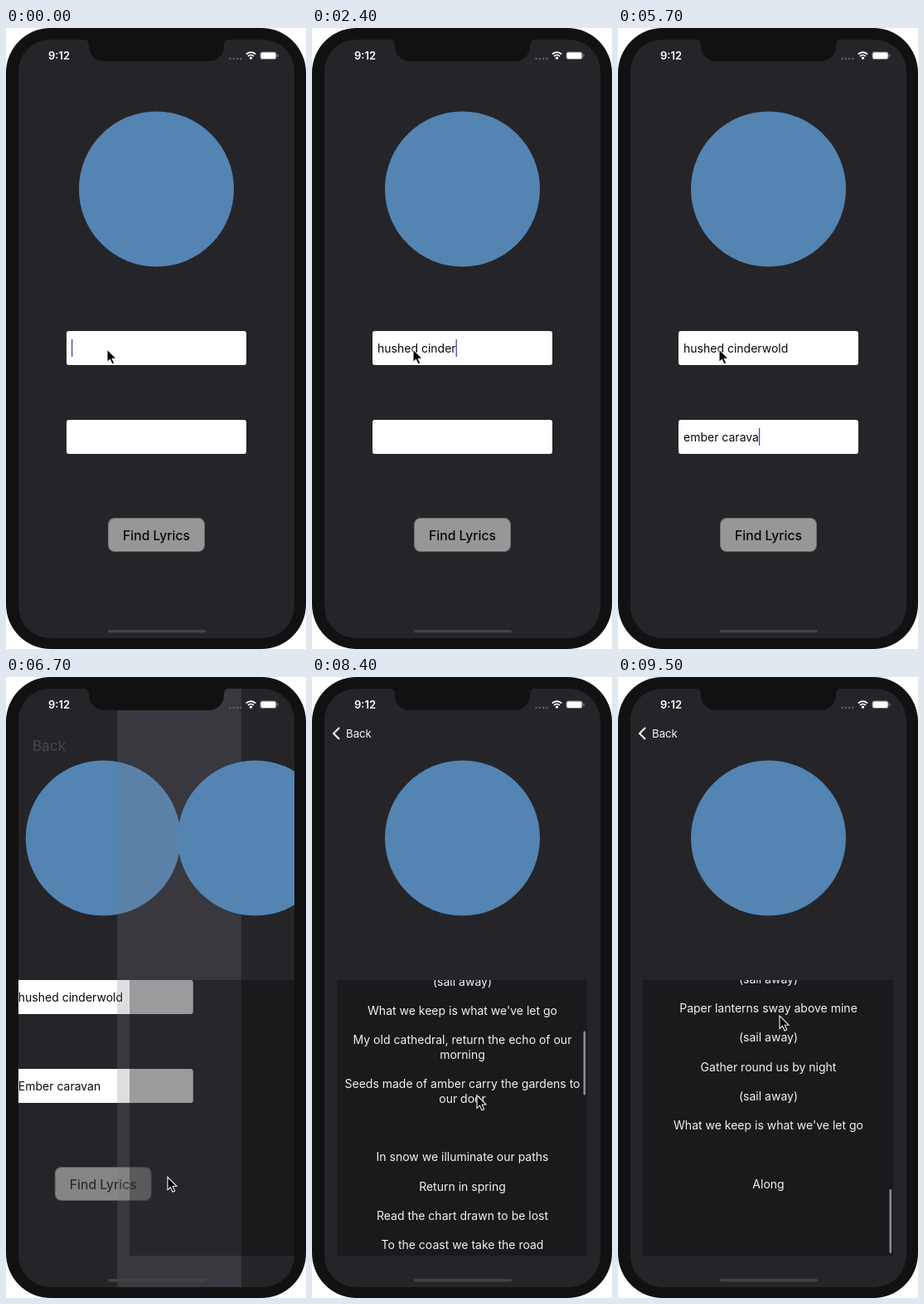
These frames come from a looping animation (362 by 748 pixels, 9600 ms). An HTML page with a canvas:

```html
<!DOCTYPE html>
<html lang="en">
<head>
<meta charset="utf-8">
<title>Lyrics finder</title>
<style>
html, body { margin: 0; width: 100%; height: 100%; overflow: hidden; background: #fff; }
canvas { display: block; width: 362px; height: 748px; }
</style>
</head>
<body>
<canvas id="stage" width="362" height="748"></canvas>
<script>
const ctx = document.getElementById('stage').getContext('2d');
const LOOP = 9600;
const ARTIST = 'hushed cinderwold', SONG = 'ember caravan';
const SCREEN = { x: 15, y: 14, w: 333, h: 721 };
const PANEL = { x: 30, y: 365, w: 302, h: 332 };
const LINE = 17.65, MAX_SCROLL = 1111;
const PAGE_FILL = 'rgba(118,118,128,.24)';

const VERSE = "Rain marks the shutters of the mill|The road is worn|In the valley, lamps relit|" +
  "Yet by dusk there's no one near|Rivers wander past the stones";
const REFRAIN = "||(sail away)||Paper lanterns sway above mine||(sail away)||" +
  "Gather round us by night||(sail away)||What we keep is what we've let go";
const CHORUS = "||My old cathedral, return the echo of our|morning||" +
  "Seeds made of amber carry the gardens to|our door";
const BRIDGE = "||||In snow we illuminate our paths||Return in spring||" +
  "Read the chart drawn to be lost||To the coast we take the road";
const LYRICS = (VERSE + REFRAIN + CHORUS + BRIDGE +
  '||(sail away)||Open windows call the evening in||(sail away)||Quiet boats are turning home' +
  CHORUS + '||||In the end we learn the way||' +
  '||(sail away)||' + VERSE + REFRAIN + '||||Along').split('|');

const clamp = v => Math.min(1, Math.max(0, v));
const mix = (a, b, u) => a + (b - a) * u;

// Linear interpolation through [time, value] points
function track(t, points) {
  let [t0, v0] = points[0];
  for (const [t1, v1] of points) {
    if (t < t1) return mix(v0, v1, clamp((t - t0) / (t1 - t0)));
    [t0, v0] = [t1, v1];
  }
  return v0;
}

function box(x, y, w, h, r, fill) {
  ctx.beginPath();
  ctx.roundRect(x, y, w, h, r);
  ctx.fillStyle = fill;
  ctx.fill();
}

function disc(x, y, r, fill) {
  ctx.beginPath();
  ctx.arc(x, y, r, 0, 7);
  ctx.fillStyle = fill;
  ctx.fill();
}

function label(text, x, y, size, fill, align = 'left', weight = 400) {
  ctx.font = `${weight} ${size}px Inter, sans-serif`;
  ctx.textAlign = align;
  ctx.textBaseline = 'alphabetic';
  ctx.fillStyle = fill;
  ctx.fillText(text, x, y + size * .36);
}

const logo = () => disc(181.5, 194, 93.5, '#5484b2');

function field(y, text, caret) {
  box(73, y, 217, 41, 3, '#fff');
  label(text, 79, y + 20.5, 14, '#0a0a0a');
  if (caret) box(79 + ctx.measureText(text).width, y + 10, 1.3, 21, 0, '#3d48a0');
}

function typed(word, t, start, step) {
  return word.slice(0, Math.floor(clamp((t - start) / (step * word.length)) * word.length + 1e-6));
}

function searchPage(t) {
  box(SCREEN.x, SCREEN.y, SCREEN.w, SCREEN.h, 0, PAGE_FILL);
  logo();
  const first = t < 3250;
  const artist = typed(ARTIST, t, 400, 150);
  let song = typed(SONG, t, 3500, 175);
  if (t >= 6000) song = song[0].toUpperCase() + song.slice(1);
  field(365, artist, first);
  field(472, song, !first && t < 6000);
  ctx.globalAlpha = t > 6400 ? .7 : 1;
  box(123, 590, 117, 41, 8, '#717173');
  box(124, 591, 115, 39, 7, '#979798');
  label('Find Lyrics', 181.5, 611, 15.7, '#080808', 'center', 500);
  ctx.globalAlpha = 1;
}

function lyricsPage(t, scroll) {
  box(SCREEN.x, SCREEN.y, SCREEN.w, SCREEN.h, 0, PAGE_FILL);
  logo();
  box(PANEL.x, PANEL.y, PANEL.w, PANEL.h, 0, 'rgba(0,0,0,.3)');
  if (t < 7200) return;
  ctx.save();
  ctx.beginPath();
  ctx.rect(PANEL.x, PANEL.y, PANEL.w, PANEL.h);
  ctx.clip();
  LYRICS.forEach((line, i) => {
    const y = 380.5 + i * LINE - scroll;
    if (line && y > 350 && y < 712) label(line, 181.5, y, 14, '#f2f2f2', 'center');
  });
  if (scroll > 0) box(327.5, mix(368, 617, scroll / MAX_SCROLL), 2.6, 77, 1.3, '#8b8b8e');
  ctx.restore();
}

function backButton(p) {
  ctx.globalAlpha = p ** 4;
  label('Back', mix(15, 41, p), mix(110, 68, p), mix(25, 13.2, p), '#f4f4f4');
  ctx.globalAlpha = clamp(p * 4 - 3);
  ctx.beginPath();
  ctx.moveTo(33, 61);
  ctx.lineTo(26, 68);
  ctx.lineTo(33, 75);
  ctx.strokeStyle = '#fff';
  ctx.lineWidth = 2;
  ctx.stroke();
  ctx.globalAlpha = 1;
}

function statusBar() {
  ctx.beginPath();
  ctx.moveTo(93, 13);
  ctx.quadraticCurveTo(100, 14, 100, 21);
  ctx.arcTo(100, 40, 119, 40, 18);
  ctx.arcTo(263, 40, 263, 21, 18);
  ctx.lineTo(263, 21);
  ctx.quadraticCurveTo(263, 14, 270, 13);
  ctx.fillStyle = '#111112';
  ctx.fill();

  label('9:12', 51, 33.3, 13, '#fff', 'left', 600);
  for (let i = 0; i < 4; i++) disc(270.5 + i * 4.3, 37, 1.2, '#626265');
  ctx.strokeStyle = '#fff';
  ctx.lineWidth = 1.9;
  for (const r of [8.2, 4.9]) {
    ctx.beginPath();
    ctx.arc(295.5, 37.5, r, -2.34, -.8);
    ctx.stroke();
  }
  disc(295.5, 36.2, 1.6, '#fff');
  box(306.5, 28.5, 20, 9.5, 2.8, '#77777a');
  box(307.5, 29.5, 18, 7.5, 2, '#fff');
  box(327.3, 31.5, 1.3, 3.5, 1, '#77777a');
}

function pointer(x, y) {
  ctx.save();
  ctx.translate(x, y);
  ctx.beginPath();
  for (const [px, py] of [[0, 0], [0, 15.5], [3.5, 12.3], [6, 18], [8.7, 16.8], [6.2, 11.3], [11, 11]])
    ctx.lineTo(px, py);
  ctx.closePath();
  ctx.fillStyle = '#000';
  ctx.fill();
  ctx.strokeStyle = '#f4f4f4';
  ctx.lineWidth = 1.1;
  ctx.stroke();
  ctx.restore();
}

function draw(now) {
  const t = now % LOOP;
  const push = 1 - (1 - clamp((t - 6500) / 500)) ** 2;
  const scroll = track(t, [[7700, 0], [8000, 50], [8400, 260], [8700, 570], [9000, 860], [9300, 1070], [9450, MAX_SCROLL]]);

  ctx.clearRect(0, 0, 362, 748);
  box(0, 0, 362, 748, 54, '#111112');
  ctx.save();
  box(SCREEN.x, SCREEN.y, SCREEN.w, SCREEN.h, 38, '#0c0c0d');
  ctx.clip();
  if (push < 1) {
    ctx.save();
    ctx.translate(-100 * push, 0);
    searchPage(t);
    ctx.restore();
  }
  if (push > 0) {
    ctx.save();
    ctx.translate(SCREEN.w * (1 - push), 0);
    lyricsPage(t, scroll);
    ctx.restore();
    backButton(push);
  }
  box(123, 725, 118, 3.5, 2, '#434346');
  ctx.restore();
  statusBar();

  const x = track(t, [[6000, 122], [6350, 195], [7700, 195], [8400, 199], [9000, 195]]);
  const y = track(t, [[6000, 387], [6350, 602], [7700, 603], [8400, 504], [9000, 408]]);
  pointer(x, y);
}

function tick() {
  draw(performance.now());
  requestAnimationFrame(tick);
}
tick();
</script>
</body>
</html>
```
